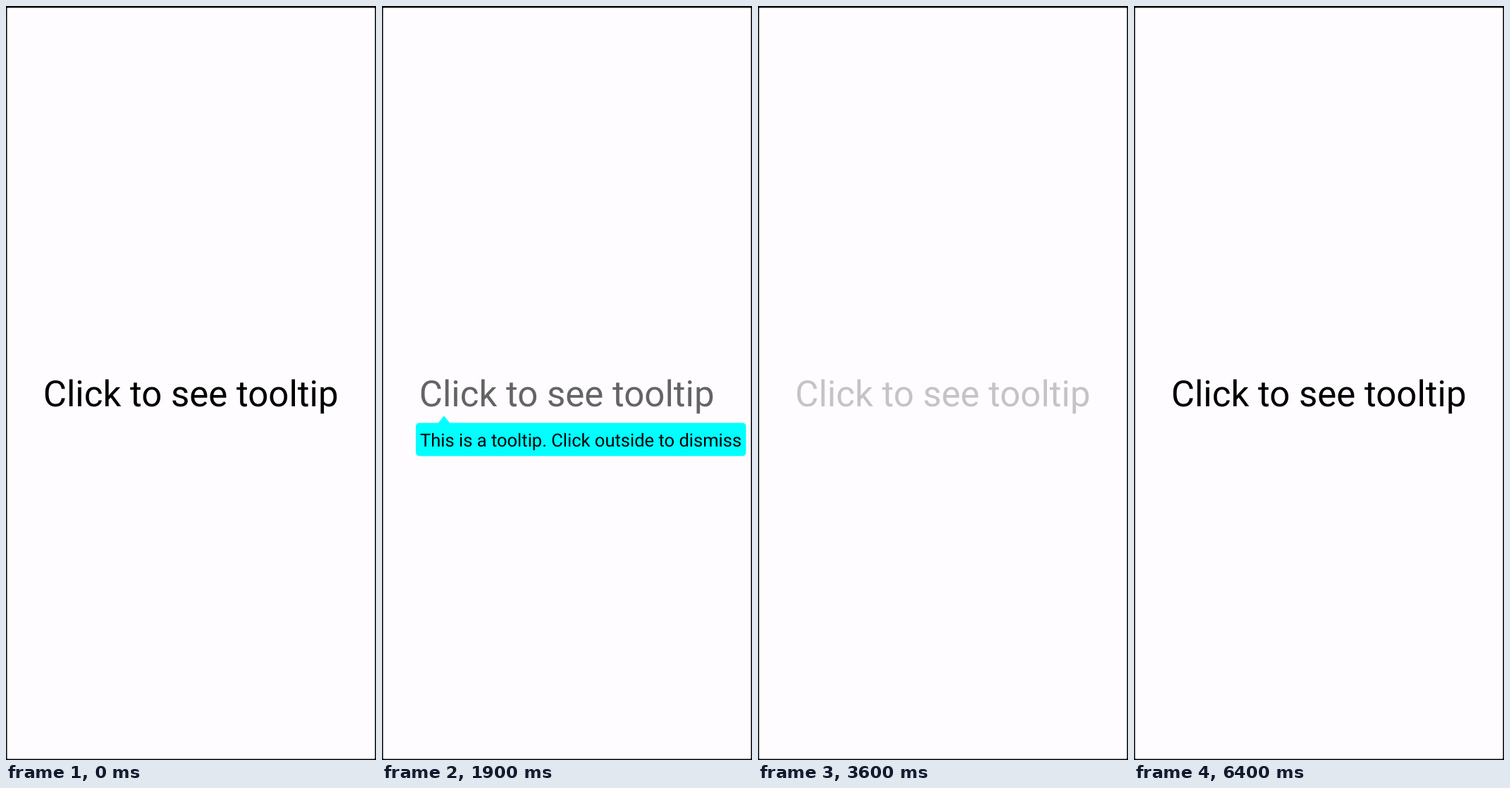
An HTML page for the animation above (6800 ms loop, 525 px wide and 1068 px high).

```html
<!DOCTYPE html>
<html lang="en">
<head>
<meta charset="utf-8">
<title>Tooltip</title>
<style>
  html, body { margin: 0; width: 100%; height: 100%; overflow: hidden; background: #000; }
  svg { display: block; width: 525px; height: 1068px; }
  text { font-family: Roboto, Arial, sans-serif; text-rendering: geometricPrecision; white-space: pre; }
</style>
</head>
<body>
<svg viewBox="0 0 525 1068">
  <rect x="1.5" y="2.5" width="522" height="1064" rx="1" fill="#fefcff"/>
  <text id="label" x="52.7" y="567" font-size="51.04">Click to see tooltip</text>
  <g id="tip">
    <path d="M79 591.5 L88 580.5 L97 591.5 Z" fill="#0ff"/>
    <rect x="48" y="590.5" width="468.5" height="47" rx="5" fill="#0ff"/>
    <text x="54" y="624" font-size="25.52">This is a tooltip. Click outside to dismiss</text>
  </g>
</svg>
<script>
  const LOOP = 6800;
  // [start ms, label opacity, tooltip visible]
  const steps = [
    [0, 1, false],
    [1800, 0.22, false],
    [1900, 0.6, true],
    [2000, 1, true],
    [2800, 1, false],
    [3600, 0.22, false],
    [3700, 0.6, true],
    [3800, 1, true],
    [6400, 1, false]
  ];
  const label = document.getElementById('label');
  const tip = document.getElementById('tip');
  const start = performance.now();

  function draw(t) {
    const [, opacity, shown] = steps.findLast(step => step[0] <= t);
    label.setAttribute('opacity', opacity);
    tip.setAttribute('visibility', shown ? 'visible' : 'hidden');
  }

  function tick() {
    draw((performance.now() - start) % LOOP);
    requestAnimationFrame(tick);
  }
  tick();
</script>
</body>
</html>
```
